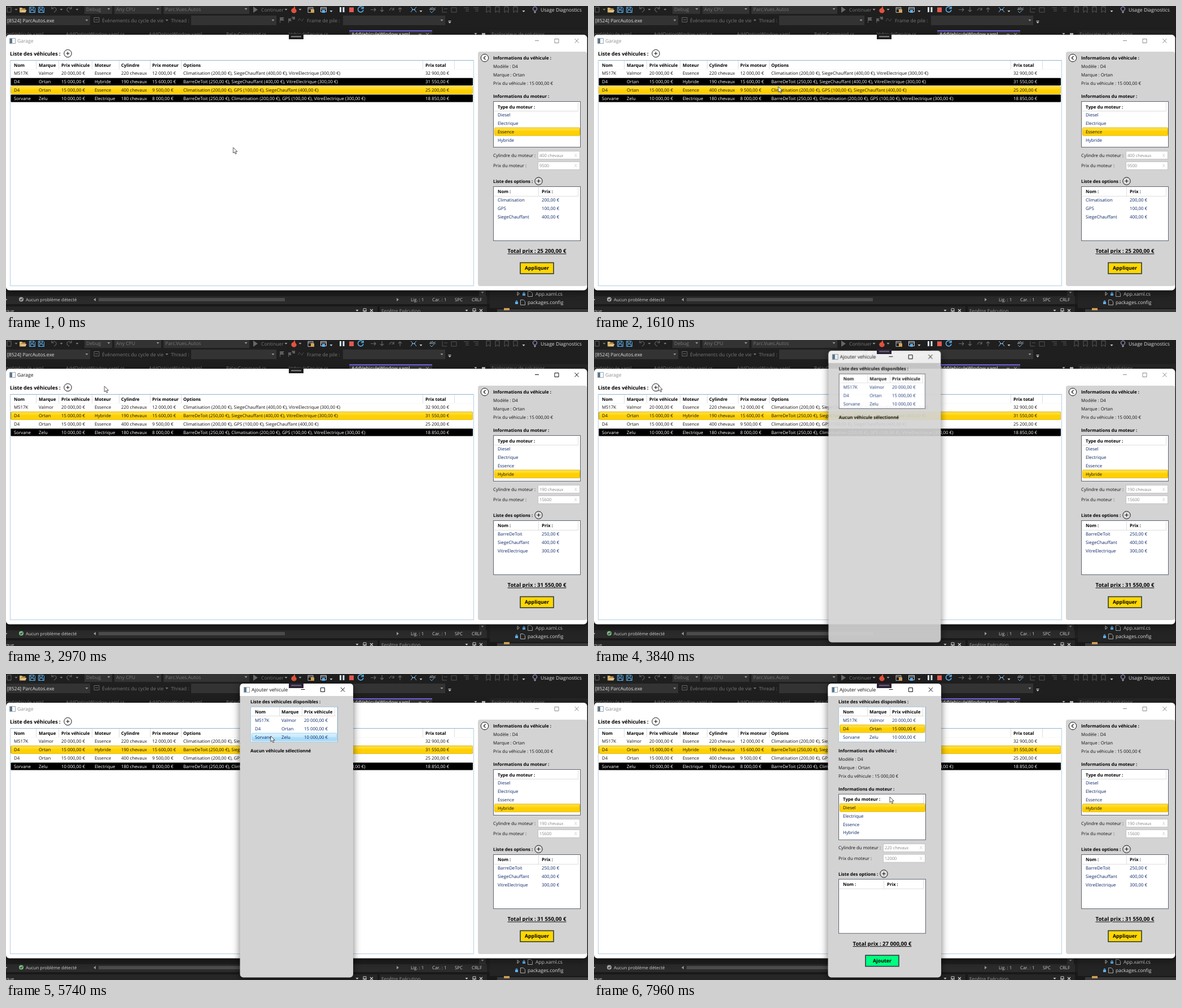
These frames come from a looping animation (1031 px wide and 543 px high, 8000 ms). An HTML page:

```html
<!DOCTYPE html>
<html lang="fr">
<head>
<meta charset="utf-8">
<title>Garage</title>
<style>
  html, body { margin: 0; width: 100%; height: 100%; overflow: hidden; background: #1f1f1f; }
  svg { display: block; width: 100vw; height: 100vh; }
  text { font-family: "Open Sans", "Noto Sans", sans-serif; white-space: pre; text-rendering: geometricPrecision; }
  .shadow { filter: drop-shadow(0 3px 7px rgba(0, 0, 0, .55)); }
  #popup { transform-origin: 515px 278px; }
</style>
</head>
<body>
<svg id="stage" viewBox="0 0 1031 543" preserveAspectRatio="none">
  <defs>
    <linearGradient id="gold" x2="0" y2="1">
      <stop offset="0" stop-color="#ffe25a"/><stop offset=".35" stop-color="#ffd91c"/>
      <stop offset=".5" stop-color="#ffd000"/><stop offset="1" stop-color="#fdd008"/>
    </linearGradient>
    <linearGradient id="sky" x2="0" y2="1">
      <stop offset="0" stop-color="#dcf2fd"/><stop offset=".48" stop-color="#c6e9fc"/>
      <stop offset=".52" stop-color="#afdffa"/><stop offset="1" stop-color="#a5daf8"/>
    </linearGradient>
  </defs>
</svg>
<script>
const LOOP = 8000;
const SELECT = 2350, OPEN = 3700, PICK = 7075;
const SIZE = 7.87, NAVY = '#0a2567';

// Drawing helpers; text is placed by its vertical centre.
const text = (x, cy, s, { size = SIZE, fill = '#111', bold, weight = bold ? 700 : 400, extra = '' } = {}) =>
  `<text x="${x}" y="${cy + size * .36}" font-size="${size}" font-weight="${weight}" fill="${fill}" ${extra}>${s}</text>`;
const bold = (x, cy, s, opts) => text(x, cy, s, { fill: '#000', bold: true, ...opts });
const rect = (x, y, x2, y2, fill, extra = '') =>
  `<rect x="${x}" y="${y}" width="${x2 - x}" height="${y2 - y}" fill="${fill}" ${extra}/>`;
const line = (d, stroke, width = 1) => `<path d="${d}" fill="none" stroke="${stroke}" stroke-width="${width}"/>`;
const shape = (d, fill) => `<path d="${d}" fill="${fill}"/>`;
const caret = (x, y, fill = '#999') => shape(`M${x - 2.5} ${y - 1}h5l-2.5 3z`, fill);
const box = (x, y, x2, y2, stroke, fill = '#fff') =>
  rect(x + .5, y + .5, x2 - .5, y2 - .5, fill, `stroke="${stroke}"`);
const during = (spans, body) => `<g data-on="${spans}">${body}</g>`;
const plusButton = (x, y, fill = '#fff') =>
  `<circle cx="${x}" cy="${y}" r="6.7" fill="${fill}" stroke="#111"/>` + line(`M${x - 3} ${y}h6M${x} ${y - 3}v6`, '#111');
const bar = (x, y, x2, y2, kind) => ({
  black: () => rect(x, y, x2, y2, '#000', 'rx="1"'),
  gold: () => rect(x + .5, y + .5, x2 - .5, y2 - .5, 'url(#gold)', 'rx="1.5" stroke="#e3b70a"'),
  sky: () => rect(x + .5, y + .5, x2 - .5, y2 - .5, 'url(#sky)', 'rx="1.5" stroke="#99d3f3"'),
  plain: () => rect(x, y, x2, y2, '#fff'),
}[kind]());
const headerRule = (xs, x, x2, y) =>
  line(`M${x} ${y + 15.5}H${x2}` + xs.map(c => `M${c + .5} ${y}v15`).join(''), '#dedede');

function ide() {
  const dim = '#777', mid = '#999', blue = '#5cb3f2', size = 8.55;
  const combo = (x, y, x2, label, fill = dim) => rect(x, y, x2, y + 17, '#333') +
    text(x + 3, y + 9, label, { size, fill }) + caret(x2 - 6, y + 8, mid);
  const disk = x => line(`M${x + .5} 2h8.500l1.500 1.500v8h-10zM${x + 2.5} 2v3.500h5v-3.500M${x + 2.5} 11.500v-4h6v4`, blue);
  const bookmark = x => line(`M${x} 1.5h7v10l-3.5-3l-3.5 3z`, '#5d5d5d');
  const arrow = d => line(d, '#666', 1.2);
  const tab = (x, s, fill = '#8b8b8b', weight = 400) => text(x, 50, s, { size: 8.3, fill, weight });
  const small = (x, s, cy = 521.5) => text(x, cy, s, { size: 7.9, fill: '#d0d0d0' });
  const panelIcons = x => caret(x, 540, '#ccc') + line(`M${x + 11} 537h5v4h-5zM${x + 10} 541.5h7M${x + 13.5} 541v3`, '#ccc') +
    line(`M${x + 23} 538l5 5m0-5l-5 5`, '#ccc', 1.2);

  return rect(0, 0, 1031, 543, '#1f1f1f') +
    line('M2 2h7v9h-7z', '#666') + caret(18, 6, dim) +
    shape('M24 3h4l1.5 1.5h5v2h-7l-2 5h-1.5z', '#d7b06a') + shape('M27 7h9.500l-2 4.500h-9z', '#e8c27c') +
    disk(41) + disk(57) +
    line('M81 1v4h4M81 5q5-5 8 0q1 3-4 6', '#606060', 1.2) + caret(98, 6, dim) +
    line('M116 1v4h-4M116 5q-5-5-8 0q-1 3 4 6', '#606060', 1.2) + caret(126, 6, dim) +
    combo(139, -3, 188, 'Debug') + combo(192, -3, 275, 'Any CPU') + combo(279, -3, 431, 'Parc.Vues.Autos') +
    shape('M438 1l8 5.500l-8 5.500z', '#686868') + text(452, 6.5, 'Continuer', { size, fill: dim }) + caret(496, 6, mid) +
    shape('M511 0q-1 4-4.500 5q-3 4 1 7q5 2 7-2q1-3-2-5q0-3-1.500-5z', '#e2533c') + caret(521, 6, mid) +
    line('M535 2.500h9v9h-9zM535 5h9', '#bbb') + rect(540, 6, 546, 12, '#d7a552') +
    line('M557.500 2.500h10v8h-10zM557.500 5h10', '#c8d5e0') + rect(560, 7, 565, 12, blue) + caret(576, 9, '#ccc') +
    rect(591, 2, 594, 11, '#d5e5f2') + rect(596.5, 2, 599.5, 11, '#d5e5f2') + rect(608, 2.5, 616, 11, '#e05a50') +
    line('M632 3a4.800 4.800 0 1 0 1 4M633 1v3.500h-4', blue, 1.5) +
    arrow('M646 6.500h9m-3-3l3 3l-3 3') + arrow('M666 2v8m-3-3l3 3l3-3') +
    arrow('M679 8q4-8 8-1m0-4v4h-4') + arrow('M698 11v-8m-3 3l3-3l3 3') +
    line('M717 2l4 4l-4 5M727 2l-4 4l4 5M719 6.500h6', '#85bde8') + caret(735, 9, '#ccc') +
    text(750, 4, 'abc', { size: 7, fill: '#ddd' }) + line('M751 9l3 3l5-5', blue) +
    line('M773 2v9h8M776 5h6M789 3h9v8h-9z', '#555') + line('M811 3h9M814 6h6M814 9h6M828 3h9M831 6h6M831 9h6', '#555') +
    [851, 867, 883, 899].map(bookmark).join('') + caret(917, 9, '#ccc') +
    `<circle cx="937" cy="5" r="3.600" fill="none" stroke="#b9a5e8"/>` + line('M935 10.500h4M936 12h2', '#ccc') +
    text(947, 6.5, 'Usage Diagnostics', { size: 8.6, fill: '#ddd' }) +
    // Debug location row
    combo(-1, 17, 149, '[8524] ParcAutos.exe', '#e2e2e2') +
    line('M156 20.500h9v8h-9zM158 24.500h5', '#666') + text(170, 25.5, 'Événements du cycle de vie', { size, fill: dim }) + caret(285, 25, dim) +
    text(292, 25.5, 'Thread :', { size, fill: dim }) + combo(328, 17, 479, '') +
    shape('M485 20h8l-2 3l2 3h-7v4h-1z', '#5c5c5c') + shape('M500 22h6l-1.500 2.500l1.500 2.500h-5v3h-1zM506 19h6v5h-4z', '#5c5c5c') +
    line('M517 27l3-5l4 5l3-5', '#4b4b4b') +
    text(533, 25.5, 'Frame de pile :', { size, fill: dim }) + combo(597, 17, 778, '') +
    line('M783.500 26.500h5', '#ccc') + caret(786, 29, '#ccc') +
    // Document tabs
    rect(608, 43, 755, 51, '#383838') + rect(608, 43, 755, 45, '#7160e8') +
    tab(0, 'ontVehicule.xaml') + tab(106, 'AddOptionWindow.xaml.cs') + tab(253, 'AddOptionWindow.xaml') +
    tab(390, 'RelayCommand.cs') + tab(501, 'VehiculeService.cs') + tab(612, 'AddVehiculeWindow.xaml', '#eee', 600) +
    line('M731 50h5M744 48l5 5m0-5l-5 5', '#ccc') + caret(832, 49, '#ccc') + line('M843 49.500h6', '#ccc', 3) +
    rect(857, 43, 1031, 51, '#262626') + tab(860, 'Explorateur de solutions') +
    // Bottom strip
    rect(0, 515, 852, 529, '#2b2b2b') + rect(838, 504, 850, 515, '#303030') + caret(844, 508, '#999') +
    caret(0, 521, '#aaa') +
    ['#a9a9a9', '#7fbf86'].map((fill, i) => during(i ? `${SELECT}-${PICK}` : `0-${SELECT},${PICK}-${LOOP}`,
      `<circle cx="27" cy="520.500" r="4" fill="${fill}"/>` + line('M25 520.500l1.500 1.700l2.800-3', '#1f1f1f', 1.1))).join('') +
    small(35, 'Aucun problème détecté') + shape('M159 518v6l-4-3z', '#999') + rect(164, 518, 494, 524, '#4c4c4c') + shape('M692 518v6l4-3z', '#999') +
    small(717, 'Lig. : 1') + small(755, 'Car. : 1') + small(795, 'SPC') + small(825, 'CRLF') +
    rect(0, 529, 1031, 543, '#191919') + rect(0, 533, 658, 543, '#262626') + rect(662, 533, 852, 543, '#262626') +
    small(0, 'que', 541) + text(665, 541, 'Fenêtre Exécution', { size: 8.3, fill: '#999' }) + panelIcons(622) + panelIcons(816) +
    rect(857, 504, 1031, 536, '#242424') + line('M906 507.500l3.500 3l-3.500 3z', '#ccc') +
    rect(915, 510, 920, 514, blue) + line('M916.500 510v-2h2v2', blue) + line('M924.500 506.500h5l3 3v6h-8z', '#aaa') +
    rect(902, 525, 907, 529, blue) + line('M903.500 525v-2h2v2', blue) + line('M911.500 521.500h5l3 3v6h-8z', '#aaa') +
    text(938, 511, 'App.xaml.cs', { size, fill: '#ddd' }) + text(924, 525.5, 'packages.config', { size, fill: '#ddd' }) +
    rect(870, 538, 1031, 543, '#3a3a3a') + rect(882, 536, 892, 540, '#c99d52');
}

function windowChrome(y, titleX, title, [min, max, close], ink) {
  const x = titleX - 14;
  return box(x, y - 5, x + 11, y + 5, '#9aa5ad') + rect(x + 1, y - 4, x + 5, y + 4, '#58778f') +
    text(titleX, y, title, { size: 8.55, fill: ink }) +
    line(`M${min - 3.5} ${y - .5}h7`, ink) + line(`M${max - 3.5} ${y - 3.5}h7v7h-7z`, ink) +
    line(`M${close - 3.5} ${y - 4}l7 7.500m0-7.500l-7 7.500`, ink);
}

const ENGINES = ['Diesel', 'Electrique', 'Essence', 'Hybride'];

// Vehicle sheet shared by the side panel and the dialog.
function details({ engine, power, price, options, total, action, color }) {
  const rowY = i => 193.5 + i * 14.75;
  const field = (y, label, value) => text(863, y, label) + box(942, y - 7.5, 1017, y + 7.5, '#c3c3c3') +
    text(945, y + .3, value, { size: 7.5, fill: '#444', weight: 300 }) + text(1007, y, 'X', { size: 8, fill: '#c6c6c6' });
  return bold(863, 92, 'Informations du véhicule :') + text(863, 107, 'Modèle : D4') + text(863, 122.3, 'Marque : Ortan') +
    text(863, 137.5, 'Prix du véhicule : 15 000,00 €') + bold(863, 160.3, 'Informations du moteur :') +
    box(863, 169, 1018, 251, '#5f6570') + headerRule([1013], 865, 1014, 171) + bold(871, 178.7, 'Type du moteur :') +
    bar(865, rowY(engine) - 7.5, 1017, rowY(engine) + 7.5, 'gold') +
    ENGINES.map((s, i) => text(871, rowY(i), s, { fill: i === engine ? '#111' : NAVY })).join('') +
    field(264.7, 'Cylindre du moteur :', power + ' chevaux') + field(283.4, 'Prix du moteur :', price) +
    bold(863, 311, 'Liste des options :') + plusButton(943.5, 310.7, '#dcdcdc') +
    box(863, 320, 1018, 417, '#5f6570') + headerRule([943, 1013], 865, 1014, 322) + bold(871, 329.3, 'Nom :') + bold(949, 329.3, 'Prix :') +
    options.map(([name, cost], i) => text(871, 344.2 + i * 14.75, name, { fill: NAVY }) +
      text(949, 344.2 + i * 14.75, cost + ',00 €', { fill: NAVY })).join('') +
    bold(940.5, 435, total, { size: 9.55, extra: 'text-anchor="middle" text-decoration="underline"' }) +
    rect(911, 455.5, 970, 475, color, 'stroke="#2f3a44" stroke-width="1.600"') +
    bold(940.5, 465, action, { size: 8.8, extra: 'text-anchor="middle"' });
}

const COLUMNS = [14, 58, 98, 157, 204, 259, 314, 743];
const HEADINGS = ['Nom', 'Marque', 'Prix véhicule', 'Moteur', 'Cylindre', 'Prix moteur', 'Options', 'Prix total'];
const CARS = [
  ['M517K', 'Valmor', '20 000,00 €', 'Essence', '220 chevaux', '12 000,00 €', 'Climatisation (200,00 €), SiegeChauffant (400,00 €), VitreElectrique (300,00 €)', '32 900,00 €'],
  ['D4', 'Ortan', '15 000,00 €', 'Hybride', '190 chevaux', '15 600,00 €', 'BarreDeToit (250,00 €), SiegeChauffant (400,00 €), VitreElectrique (300,00 €)', '31 550,00 €'],
  ['D4', 'Ortan', '15 000,00 €', 'Essence', '400 chevaux', '9 500,00 €', 'Climatisation (200,00 €), GPS (100,00 €), SiegeChauffant (400,00 €)', '25 200,00 €'],
  ['Sorvane', 'Zelu', '10 000,00 €', 'Electrique', '180 chevaux', '8 000,00 €', 'BarreDeToit (250,00 €), Climatisation (200,00 €), GPS (100,00 €), VitreElectrique (300,00 €)', '18 850,00 €'],
];

function carRow(i, kind) {
  const y = 119.6 + i * 14.75;
  const half = kind === 'black' ? 6.7 : 7.4;
  return bar(8.5, y - half, 827, y + half, kind) +
    CARS[i].map((s, c) => text(COLUMNS[c], y, s, { fill: kind === 'black' ? '#fff' : '#111' })).join('');
}

function mainWindow() {
  const buttons = [940.5, 975.5, 1011];
  const sheet = { action: 'Appliquer', color: '#ffd700' };
  return `<g class="shadow">${rect(0, 51, 1029.5, 504.5, '#fff', 'rx="6"')}</g>` +
    during(`0-${SELECT},${OPEN}-${LOOP}`, windowChrome(62, 20, 'Garage', buttons, '#8c8c8c')) +
    during(`${SELECT}-${OPEN}`, windowChrome(62, 20, 'Garage', buttons, '#111')) +
    bold(7, 84.3, 'Liste des véhicules :', { size: 9.1 }) + plusButton(109.5, 84.2) +
    during(`3430-${OPEN}`, plusButton(109.5, 84.2, '#e3e3e3')) +
    box(7, 96, 829, 497, '#b5cfe2') + line('M8 96.500H828', '#8fb3cd') +
    headerRule([53, 93, 152, 200, 255, 310, 738, 794], 9, 826, 97) +
    HEADINGS.map((s, i) => bold(COLUMNS[i], 105, s)).join('') +
    carRow(0, 'plain') + carRow(1, 'black') + carRow(2, 'plain') + carRow(3, 'black') +
    during(`0-${SELECT}`, carRow(2, 'gold')) + during('1370-1520', carRow(3, 'sky')) +
    during(`1690-${SELECT}`, carRow(1, 'sky')) + during(`${SELECT}-${LOOP}`, carRow(1, 'gold')) +
    rect(836, 81, 1029, 497, '#d3d3d3', 'rx="4"') +
    `<circle cx="848" cy="92.200" r="6.700" fill="#fff" stroke="#111"/>` + line('M849.500 89l-3.200 3.200l3.200 3.200', '#111', 1.2) +
    during(`0-${SELECT}`, details({ ...sheet, engine: 2, power: 400, price: 9500, total: 'Total prix : 25 200,00 €',
      options: [['Climatisation', 200], ['GPS', 100], ['SiegeChauffant', 400]] })) +
    during(`${SELECT}-${LOOP}`, details({ ...sheet, engine: 3, power: 190, price: 15600, total: 'Total prix : 31 550,00 €',
      options: [['BarreDeToit', 250], ['SiegeChauffant', 400], ['VitreElectrique', 300]] }));
}

function dialog() {
  const columns = [441, 488, 528];
  const row = (i, car, kind) => {
    const y = 82.3 + i * 14.75;
    return (kind ? bar(435, y - 7.3, 586.5, y + 7.4, kind) : '') +
      CARS[car].slice(0, 3).map((s, c) => text(columns[c], y, s, { fill: kind === 'gold' ? '#111' : NAVY })).join('');
  };
  return `<g id="popup"><g class="shadow">${rect(414.5, 17, 615, 538.5, '#d3d3d3', 'rx="6"')}</g>` +
    shape('M414.500 39V23q0-6 6-6H609q6 0 6 6V39z', '#fff') +
    windowChrome(28, 435, 'Ajouter vehicule', [526, 561, 596.5], '#111') +
    bold(433, 49, 'Liste des véhicules disponibles :') +
    box(433, 58, 587.5, 121, '#5f6570') + during(`5220-${LOOP}`, box(433, 58, 587.5, 121, '#a9cbe3')) +
    headerRule([484, 524, 582], 435, 584, 59) +
    HEADINGS.slice(0, 3).map((s, i) => bold(columns[i], 67.2, s)).join('') +
    row(0, 0) + row(1, 1) + row(2, 3) +
    during('5220-6800,7440-7530', row(2, 3, 'sky')) + during(`6800-${PICK}`, row(1, 1, 'sky')) +
    during(`${PICK}-${LOOP}`, row(1, 1, 'gold')) +
    during(`0-${PICK}`, bold(433, 136.5, 'Aucun véhicule sélectionné')) +
    during(`${PICK}-${LOOP}`, `<g transform="translate(-430 43.700)">` + details({ engine: 0, power: 220, price: 12000, options: [],
      total: 'Total prix : 27 000,00 €', action: 'Ajouter', color: '#00ff7f' }) + '</g>') + '</g>';
}

const debugTab = (y, fill, grip) => rect(501, y, 527, y + 9, fill) + rect(505, y + 3, 523, y + 5.5, grip);
const pointer = `<g id="pointer"><path d="M0 0V10L2.300 8L4 11.700L5.700 11L4.100 7.300H7.200Z" fill="#fff" stroke="#222" stroke-width=".8"/></g>`;

const stage = document.getElementById('stage');
stage.insertAdjacentHTML('beforeend', ide() + mainWindow() +
  during(`0-${OPEN}`, debugTab(50, '#1c1c1c', '#777')) + dialog() +
  during(`${OPEN + 60}-${LOOP}`, debugTab(16, '#2a2133', '#655a72')) + pointer);

const play = (el, frames) => el.animate(frames, { duration: LOOP, iterations: Infinity });

for (const el of stage.querySelectorAll('[data-on]')) {
  const spans = el.dataset.on.split(',').map(span => span.split('-').map(Number));
  const edges = [0, ...spans.flat(), LOOP].filter((t, i, all) => all.indexOf(t) === i);
  const isOn = t => spans.some(([from, to]) => t >= from && t < to);
  play(el, edges.map(t => ({ offset: t / LOOP, opacity: isOn(t) ? 1 : 0, easing: 'step-end' })));
}

play(document.getElementById('popup'), [
  { offset: 0, opacity: 0, transform: 'scale(.9)' },
  { offset: OPEN / LOOP, opacity: 0, transform: 'scale(.9)', easing: 'cubic-bezier(.1,.7,.2,1)' },
  { offset: 4000 / LOOP, opacity: 1, transform: 'scale(1)' },
  { offset: 1, opacity: 1, transform: 'scale(1)' },
]);

const PATH = [
  [0, 402.5, 251], [790, 402.5, 251], [1000, 390, 235], [1300, 347, 178], [1450, 332, 157], [1610, 326.5, 143],
  [1820, 304, 128.5], [2560, 304, 128.5], [2740, 262, 108], [2970, 174.5, 82], [3200, 132, 82], [3360, 118, 81.5], [3500, 114, 80.5],
  [4500, 114, 80.5], [4700, 170, 90], [4950, 320, 118], [5150, 432, 127], [5320, 466, 113], [5460, 469, 110],
  [6340, 469, 110], [6650, 466, 107], [6940, 462, 101], [7340, 462, 101], [7520, 474, 118], [7740, 505, 176], [7960, 524, 218], [LOOP, 524, 218],
];
play(document.getElementById('pointer'), PATH.map(([t, x, y]) => ({ offset: t / LOOP, transform: `translate(${x}px, ${y}px)` })));
</script>
</body>
</html>
```
